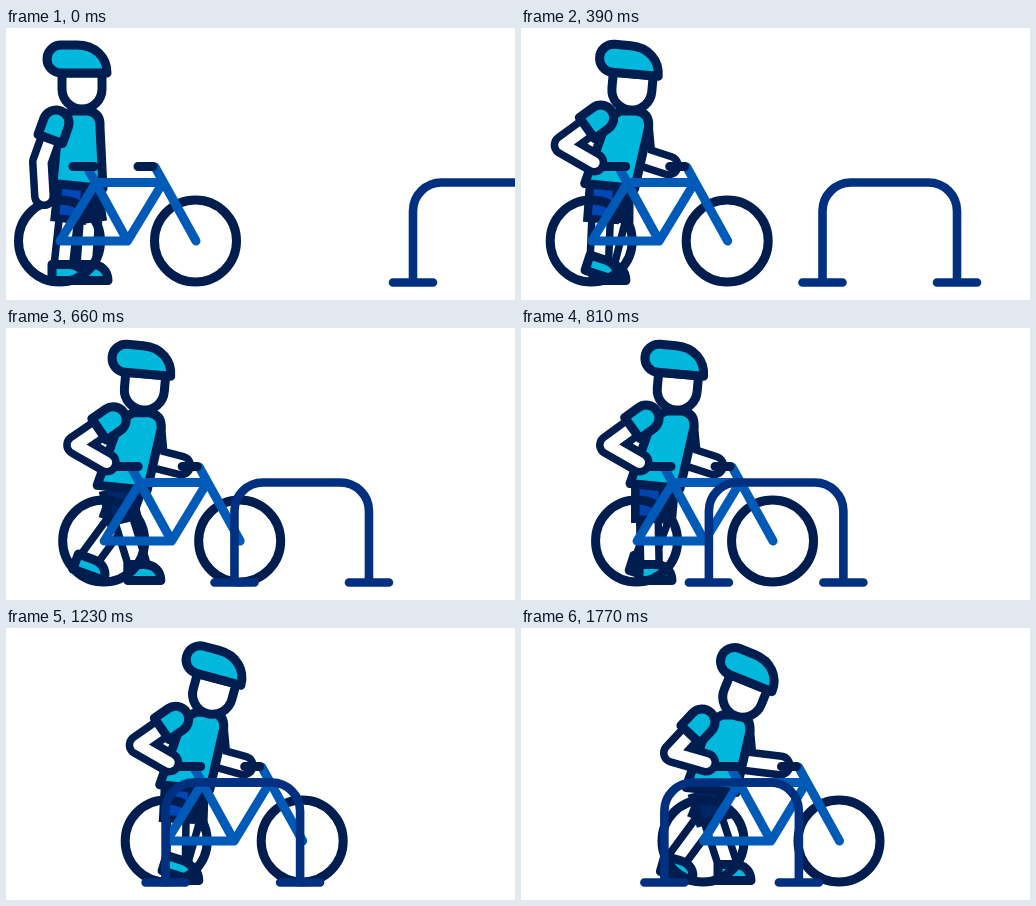
These frames come from a looping animation (509 by 272 pixels, 2.73 s). An HTML page:

```html
<!DOCTYPE html>
<html lang="en">
<head>
<meta charset="utf-8">
<title>Cyclist parking a bike</title>
<style>
  html, body { margin: 0; width: 100%; height: 100%; overflow: hidden; background: #fff; }
  svg { display: block; width: 100%; height: 100%; }
  path { stroke-linecap: round; stroke-linejoin: round; fill: none; }
  .outline { stroke: #001d50; stroke-width: 9; }
  .cyan { fill: #00b7dc; }
  .white { fill: #fff; }
  .limb { stroke: #001d50; stroke-width: 26; }
  .skin { stroke: #fff; stroke-width: 11; }
  .shorts { stroke: #001d50; stroke-width: 36; stroke-linecap: butt; }
  .cloth { stroke-width: 19; stroke-linecap: butt; }
  .frame { stroke: #005bb8; stroke-width: 9; }
  .rack { stroke: #00307f; stroke-width: 8.6; }
</style>
</head>
<body>
<svg viewBox="0 0 509 272">
  <g id="farArm"></g>
  <g id="farLeg"></g>
  <g id="nearLeg"></g>
  <path id="torso" class="outline cyan"/>
  <g id="head">
    <path class="outline white" d="M-20-18V-2A20 20 0 0 0 20-2V-18Z"/>
    <path class="outline cyan" d="M-21-18H25C25-34 13-46-5-46H-21A14 14 0 0 0-21-18Z"/>
  </g>
  <g id="bike">
    <circle class="outline" cx="53.500" cy="213" r="41" fill="none"/>
    <circle class="outline" cx="189.500" cy="213" r="41" fill="none"/>
    <path class="frame" d="M82 141L121.500 213H54L90 154.500H157L121.500 213M149 139L190 213"/>
    <path class="outline" d="M67 138.500H88M132 138.500H147"/>
  </g>
  <g id="nearArm"></g>
  <path id="sleeve" class="outline cyan" d="M-13 0A13 13 0 0 1 13 0V17H-13Z"/>
  <path id="rack" class="rack" d="M-20 254.500H20M0 254.500V183A28.500 28.500 0 0 1 28.500 154.500H106A28.500 28.500 0 0 1 134.500 183V254.500M114.500 254.500H154.500"/>
</svg>
<script>
const LOOP = 2730, END = 1770, STEP = 30;
const STRIDE = 830, FIRST_PASS = 410, LAST_STEP = FIRST_PASS + STRIDE * 1.25;

const el = id => document.getElementById(id);
const mix = (a, b, k) => a.map((p, i) => p + (b[i] - p) * k);
const smooth = u => u * u * (3 - 2 * u);
const ramp = (t, from, to) => Math.min(1, Math.max(0, (t - from) / (to - from)));
const ease = (t, from, to) => smooth(ramp(t, from, to));
const line = pts => 'M' + pts.map(p => p.join(' ')).join('L');
const place = (node, x, y, turn = 0) =>
  node.setAttribute('transform', `translate(${x} ${y}) rotate(${turn})`);

function addPaths(group, classes) {
  return classes.map(name => {
    const path = document.createElementNS('http://www.w3.org/2000/svg', 'path');
    path.setAttribute('class', name);
    return el(group).appendChild(path);
  });
}

function makeLimb(group) {
  const parts = addPaths(group, ['limb', 'skin']);
  return pts => parts.forEach(p => p.setAttribute('d', line(pts)));
}

function makeLeg(group, side) {
  const limb = makeLimb(group);
  const [shorts, cloth, shoe] = addPaths(group, ['shorts', 'cloth', 'outline cyan']);
  shoe.setAttribute('d', 'M-16 8V-8H0C11-8 17-1 17 8Z');
  return ([hipX, hipY], reach, turn, color) => {
    const x = hipX + reach, y = 244.5 - 0.27 * turn;
    const a = turn * Math.PI / 180;
    const top = [hipX + side, hipY];
    const knee = [top[0] + reach * 0.4, 195];
    const ankle = [x - 5 * Math.cos(a) + 4 * Math.sin(a), y - 4 * Math.cos(a) - 5 * Math.sin(a)];
    limb([knee, ankle]);
    shorts.setAttribute('d', line([top, knee]));
    cloth.setAttribute('d', line([top, mix(top, knee, 0.8)]));
    cloth.style.stroke = color;
    place(shoe, x, y, turn);
  };
}

const farArm = makeLimb('farArm');
const nearArm = makeLimb('nearArm');
const farLeg = makeLeg('farLeg', 6);
const nearLeg = makeLeg('nearLeg', -6);

function draw(t) {
  const walk = 118 * smooth(ramp(t, 0, 1500) ** 1.07);
  const nudge = ease(t, 1620, END);      // last push of the bike into the rack
  const lean = ease(t, 0, 330);          // from standing to holding the bike
  const bend = ease(t, 960, 1440);       // head goes down towards the rack
  const bike = walk + 10.5 * nudge;

  const phase = (Math.min(t, LAST_STEP) - FIRST_PASS) / STRIDE * 2 * Math.PI;
  const swing = lean * Math.sin(phase), speed = lean * Math.cos(phase);
  const bob = 2 * swing * swing + 2 * bend;

  place(el('bike'), bike, 0);
  place(el('rack'), 407 - 0.2705 * Math.min(t, 870) - 28.3 * ease(t, 1000, 1510), 0);
  place(el('head'), walk + 76 + 18 * lean + 9 * bend, 63 + lean + 7 * bend, 5 * lean + 17 * bend);

  const cx = walk + 74 + 17 * lean, cy = 83 + bob;
  const hip = [walk + 72, 158 + bob], [hx, hy] = hip;
  el('torso').setAttribute('d',
    `M${cx - 21} ${cy + 7}L${cx - 8} ${cy}H${cx + 8}Q${cx + 21} ${cy + 2} ${cx + 20} ${cy + 16}` +
    `L${hx + 25} ${hy + 2.5}L${hx - 25} ${hy - 2.5}Z`);

  const shoulder = [cx - 24 - 4 * lean, cy + 12 - 5 * lean];
  const elbow = [walk + 36 - 10 * lean + 8 * nudge, 134 - 17 * lean + 8 * nudge];
  nearArm([shoulder, elbow, mix([38, 168], [bike + 56.5, 134.5], lean)]);
  place(el('sleeve'), ...shoulder,
    Math.atan2(shoulder[0] - elbow[0], elbow[1] - shoulder[1]) * 180 / Math.PI);
  farArm([[cx + 8 + 3 * lean, cy + 14], [cx + 12 + 2 * lean, cy + 46],
    mix([85, 150], [bike + 131, 137.5], lean)]);

  const stand = 1 - lean;
  const heel = k => 16 * Math.max(0, k);
  const blue = mix([0, 72, 184], [0, 29, 80], 0.8 * Math.max(0, swing)).map(Math.round);
  farLeg(hip, -28 * swing - 5 + 18 * stand, heel(swing - speed), '#001d50');
  nearLeg(hip, 26 * swing - 3 - 7 * stand, heel(speed - swing), `rgb(${blue})`);
}

const start = performance.now();
function tick() {
  const t = (performance.now() - start) % LOOP;
  draw(Math.min(END, Math.floor(t / STEP) * STEP));
  requestAnimationFrame(tick);
}
tick();
</script>
</body>
</html>
```
